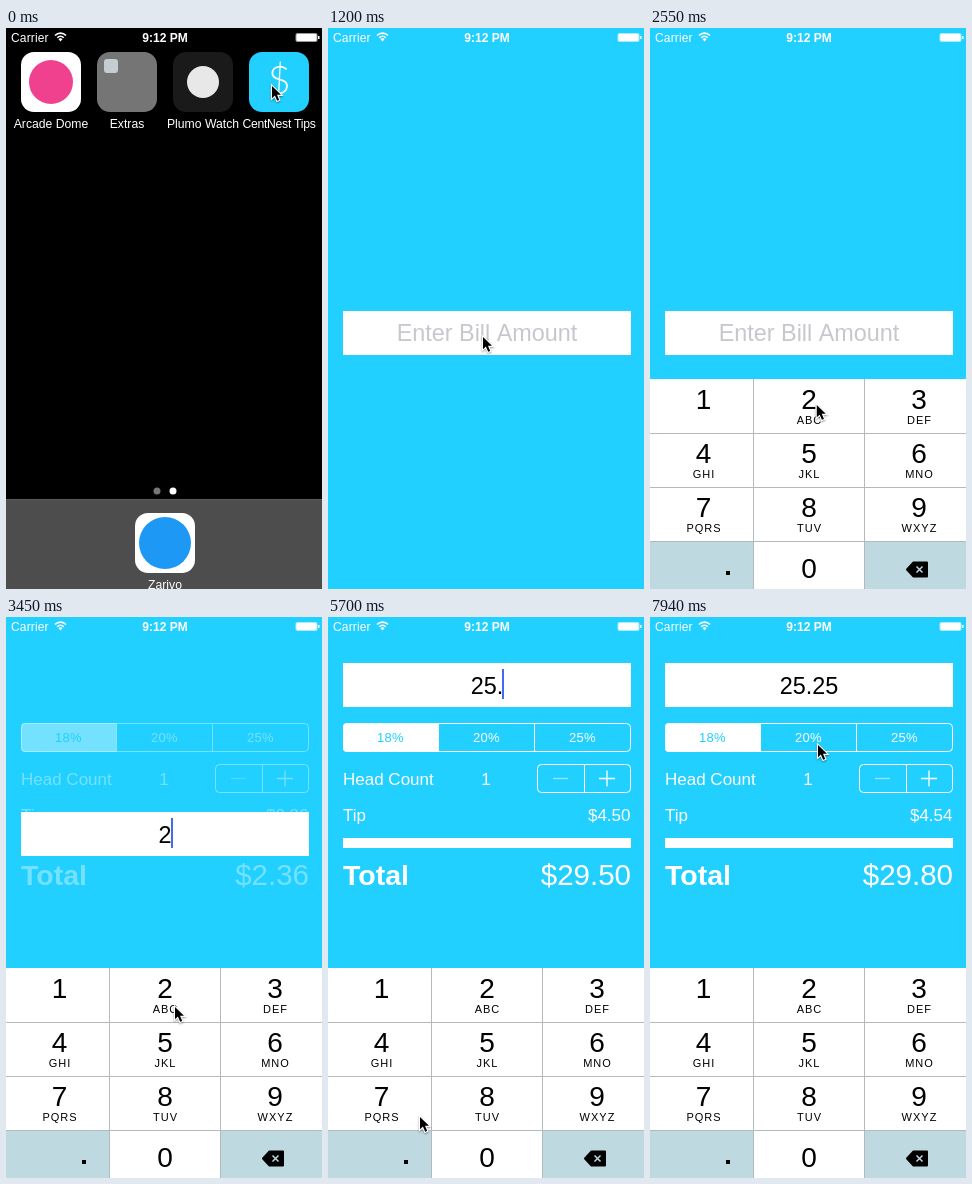
Write an HTML page with a canvas that moves like this. It is 316x561 px and loops after 8 s.

```html
<!DOCTYPE html>
<html lang="en">
<head>
<meta charset="utf-8">
<title>Tip calculator</title>
<style>
html, body { margin: 0; width: 100%; height: 100%; overflow: hidden; background: #000; }
canvas { display: block; }
</style>
</head>
<body>
<canvas id="stage" width="316" height="561"></canvas>
<script>
const ctx = document.getElementById('stage').getContext('2d');
const LOOP = 8000, STEP = 150;
const BLUE = '#21d0ff', FONT = '"Liberation Sans", Arial, sans-serif';
const DEVICE_W = 320, DEVICE_H = 567;

const TAP_FIELD = 1650;
const TYPED = [[3250, '2'], [4650, '25'], [5550, '25.'], [6590, '25.2'], [7190, '25.25']];
// Pointer stops: time, x, y
const POINTER = [
  [0, 265, 56], [600, 265, 56], [1150, 154, 307], [2100, 154, 307], [2850, 168, 388],
  [3450, 168, 388], [4050, 163, 450], [4350, 162, 441], [4650, 162, 441], [5400, 76, 545],
  [5550, 76, 545], [5700, 91, 498], [6290, 158, 380], [6590, 158, 380], [6890, 157, 432],
  [7190, 157, 432], [7790, 167, 126], [LOOP, 167, 126]
];

const clamp = v => Math.max(0, Math.min(1, v));
const mix = (a, b, p) => a + (b - a) * p;
const easeOut = (u, power = 2) => 1 - (1 - clamp(u)) ** power;

function rect(x, y, w, h, color) {
  ctx.fillStyle = color;
  ctx.fillRect(x, y, w, h);
}

function rounded(x, y, w, h, r, fill, stroke) {
  ctx.beginPath();
  ctx.roundRect(x, y, w, h, r);
  if (fill) { ctx.fillStyle = fill; ctx.fill(); }
  if (stroke) { ctx.strokeStyle = stroke; ctx.lineWidth = 1; ctx.stroke(); }
}

function circle(x, y, r, color) {
  ctx.beginPath();
  ctx.arc(x, y, r, 0, Math.PI * 2);
  ctx.fillStyle = color;
  ctx.fill();
}

function polygon(points) {
  ctx.beginPath();
  points.forEach(([x, y]) => ctx.lineTo(x, y));
  ctx.closePath();
}

function lines(color, width, ...segments) {
  ctx.beginPath();
  for (const [x1, y1, x2, y2] of segments) { ctx.moveTo(x1, y1); ctx.lineTo(x2, y2); }
  ctx.strokeStyle = color;
  ctx.lineWidth = width;
  ctx.stroke();
}

function text(str, x, y, size, color = '#fff', align = 'left', weight = 400, spacing = 0, font = FONT) {
  ctx.font = `${weight} ${size}px ${font}`;
  ctx.letterSpacing = spacing + 'px';
  ctx.textAlign = align;
  ctx.fillStyle = color;
  ctx.fillText(str, x, y);
}

function layer(alpha, draw) {
  ctx.save();
  ctx.globalAlpha *= alpha;
  draw();
  ctx.restore();
}

function statusBar() {
  text('Carrier', 5, 14, 12, '#fff', 'left', 400, 0.15);
  text('9:12 PM', 159, 14, 12, '#fff', 'center', 700);
  ctx.strokeStyle = '#fff';
  ctx.lineWidth = 1.7;
  for (const r of [4.6, 7.8]) {
    ctx.beginPath();
    ctx.arc(54.5, 13, r, -Math.PI * 0.75, -Math.PI * 0.25);
    ctx.stroke();
  }
  polygon([[54.5, 13.5], [52.4, 11], [54.5, 10], [56.6, 11]]);
  ctx.fillStyle = '#fff';
  ctx.fill();
  rounded(289.5, 5, 22, 9, 2, 'rgba(255,255,255,.6)');
  rounded(290.5, 6, 20, 7, 1, '#fff');
  rect(312, 8, 1.5, 3, '#fff');
}

function tile(x, y, color, label) {
  rounded(x, y, 60, 60, 13, color);
  text(label, x + 30, y + 76, 12.2, '#fff', 'center', 400, label.length > 11 ? -0.3 : 0);
}

function homeScreen(pressed) {
  tile(15, 24, '#fff', 'Arcade Dome');
  circle(45, 54, 22, '#f0418f');
  tile(91, 24, '#757575', 'Extras');
  rounded(98, 31, 14, 14, 3, '#c4cdd0');
  tile(167, 24, '#1a1a1a', 'Plumo Watch');
  circle(197, 54, 16, '#e8e8e8');
  tile(243, 24, BLUE, 'CentNest Tips');
  text('$', 273, 66, 40, '#fff', 'center', 300, 0, 'Lato, sans-serif');
  if (pressed) rounded(243, 24, 60, 60, 13, 'rgba(0,0,0,.4)');
  circle(151, 463, 3.5, '#757575');
  circle(167, 463, 3.5, '#fff');
  rect(0, 471, 316, 90, '#4d4d4d');
  rect(0, 471, 316, 1, '#5c5c5c');
  tile(129, 485, '#fff', 'Zarivo');
  circle(159, 515, 26, '#1e98f5');
}

function details(amount) {
  rounded(15.5, 106.5, 287, 28, 4, null, '#fff');
  rounded(15, 106, 95.5, 29, [4, 0, 0, 4], '#fff');
  lines('#fff', 1, [110.5, 107, 110.5, 134], [206.5, 107, 206.5, 134]);
  text('20%', 158.5, 125, 13, '#fff', 'center', 400, 0.3);
  text('25%', 254.5, 125, 13, '#fff', 'center', 400, 0.3);

  text('Head Count', 15, 168, 17);
  text('1', 158, 168, 17, '#fff', 'center');
  rounded(209.5, 147.5, 93, 28, 4, null, '#fff');
  lines('#fff', 1, [256.5, 148, 256.5, 175]);
  lines('rgba(255,255,255,.5)', 1.3, [225, 161.5, 240, 161.5]);
  lines('#fff', 1.3, [271, 161.5, 287, 161.5], [279, 153.5, 279, 169.5]);

  text('Tip', 15, 204, 17);
  text('$' + (amount * 0.18 - 1e-9).toFixed(2), 302.5, 204, 17, '#fff', 'right');
  rect(15, 221, 288, 10, '#fff');
  text('Total', 15, 268, 28.5, '#fff', 'left', 700);
  text('$' + (amount * 1.18 + 1e-9).toFixed(2), 303, 268, 29.5, '#fff', 'right');
}

function field(y, value, caret) {
  const shown = value || 'Enter Bill Amount';
  rect(15, y, 288, 44, '#fff');
  text(shown, 159, y + (value ? 30.5 : 29.5), 23.4, value ? '#000' : '#c7c7cd', 'center');
  if (!caret) return;
  const half = ctx.measureText(shown).width / 2;
  rect(Math.round(159 + (value ? half - 1 : -half - 3)), y + 6, 2, 30, '#426bf2');
}

function keyboard(top) {
  const letters = ['', 'ABC', 'DEF', 'GHI', 'JKL', 'MNO', 'PQRS', 'TUV', 'WXYZ'];
  const columns = [53.5, 159, 269];
  rect(0, top, 316, 216, '#fff');
  rect(0, top + 162, 103, 54, '#bed9e0');
  rect(215, top + 162, 101, 54, '#bed9e0');
  letters.forEach((label, i) => {
    const x = columns[i % 3], y = top + Math.floor(i / 3) * 54;
    text(String(i + 1), x, y + 30, 28, '#000', 'center');
    text(label, x + 0.5, y + 45, 11, '#000', 'center', 400, 1);
  });
  text('0', 159, top + 199, 28, '#000', 'center');
  rect(76, top + 192, 4, 4, '#000');
  lines('#b4b9bc', 1, ...[54, 108, 162].map(d => [0, top + d + 0.5, 316, top + d + 0.5]),
    ...[103.5, 214.5].map(x => [x, top, x, top + 216]));

  const y = top + 190.5;
  polygon([[257, y], [263.5, y - 7], [277, y - 7], [277, y + 7], [263.5, y + 7]]);
  ctx.fillStyle = ctx.strokeStyle = '#000';
  ctx.lineJoin = 'round';
  ctx.lineWidth = 2;
  ctx.fill();
  ctx.stroke();
  lines('#bed9e0', 1.5, [266.5, y - 3, 272.5, y + 3], [272.5, y - 3, 266.5, y + 3]);
}

function app(t) {
  const last = TYPED.filter(([at]) => t >= at).pop();
  const value = last ? last[1] : '';
  const focus = last ? last[0] : TAP_FIELD;
  const caret = t >= focus && (t - focus) % 1000 < 600;
  const reveal = easeOut((t - 3200) / 1000, 1.62);
  rect(0, 0, DEVICE_W, DEVICE_H, BLUE);
  statusBar();
  if (reveal) {
    layer(reveal, () => details(Number(value)));
    // The selected label is a cut-out, so it does not fade.
    text('18%', 62.5, 125, 13, BLUE, 'center', 400, 0.3);
  }
  field(Math.round(mix(283, 46, reveal)), value, caret);
  if (t > TAP_FIELD) keyboard(Math.round(351 + 216 * Math.exp((TAP_FIELD - t) / 98)));
}

function launch(t) {
  const p = easeOut((t - 150) / 410);
  const x = Math.floor(mix(243, 0, p)), y = Math.floor(mix(24, 0, p));
  const w = mix(60, DEVICE_W, p), h = Math.round(mix(84, DEVICE_H, p ** 1.47)) - y;
  const zoom = w / 60;
  layer(1 - p, () => {
    statusBar();
    ctx.translate(x - 243 * zoom, y - 24 * zoom);
    ctx.scale(zoom, zoom);
    homeScreen(t >= 150);
  });
  layer(clamp(p * 1.5), () => {
    ctx.translate(x, y);
    ctx.scale(w / DEVICE_W, h / DEVICE_H);
    app(t);
  });
}

function pointer(t) {
  const i = POINTER.findIndex(([at]) => at > t);
  const [t0, x0, y0] = POINTER[i - 1], [t1, x1, y1] = POINTER[i];
  const p = easeOut((t - t0) / (t1 - t0));
  ctx.save();
  ctx.translate(mix(x0, x1, p), mix(y0, y1, p));
  polygon([[1, 2], [1, 14.2], [3.9, 11.6], [6.2, 16.8], [8.2, 16], [6, 10.8], [10, 10.8]]);
  ctx.shadowColor = 'rgba(0,0,0,.4)';
  ctx.shadowBlur = 2;
  ctx.shadowOffsetY = 1;
  ctx.lineWidth = 2.2;
  ctx.lineJoin = 'miter';
  ctx.strokeStyle = '#fff';
  ctx.stroke();
  ctx.shadowColor = 'transparent';
  ctx.fillStyle = '#000';
  ctx.fill();
  ctx.restore();
}

function held(t) {
  const base = t < 6290 ? 0 : 6290;
  return base + Math.floor((t - base) / STEP) * STEP;
}

const start = performance.now();
function draw(now) {
  const t = held(Math.max(0, now - start) % LOOP);
  rect(0, 0, 316, 561, '#000');
  if (t < 600) launch(t);
  else app(t);
  pointer(t);
  requestAnimationFrame(draw);
}
draw(start);
</script>
</body>
</html>
```
